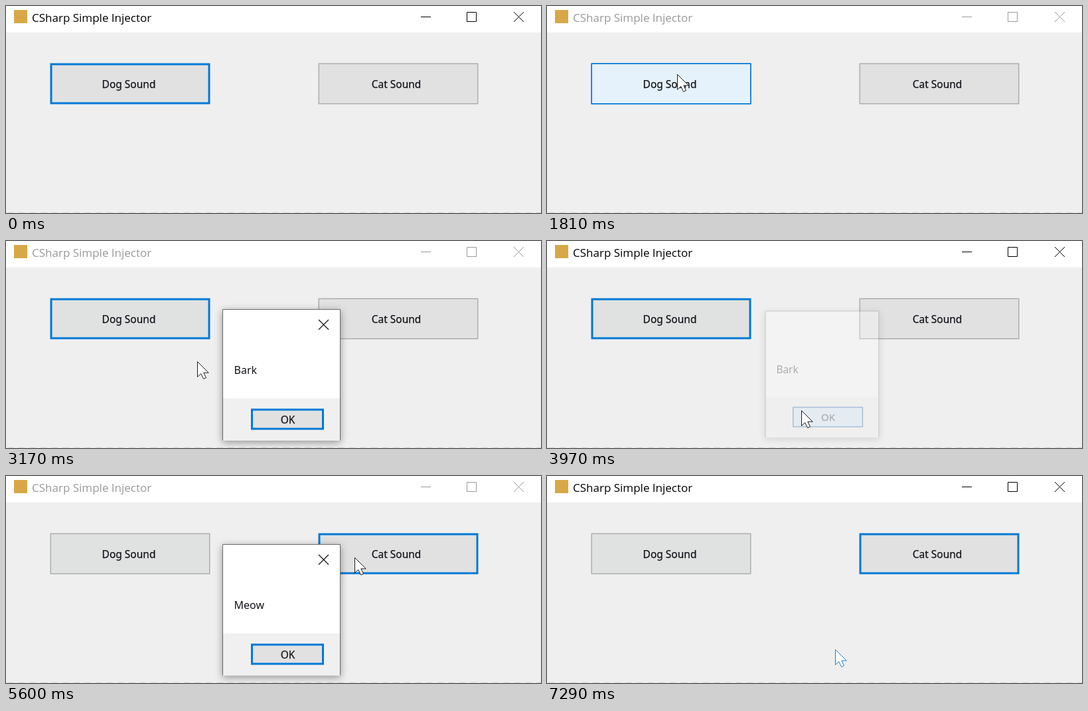
These frames come from a looping animation (806 by 313 pixels, 9.35 s). An HTML page:

```html
<!DOCTYPE html>
<html lang="en">
<head>
<meta charset="utf-8">
<title>CSharp Simple Injector</title>
<style>
  html, body { margin: 0; width: 100%; height: 100%; overflow: hidden; background: #efefef; }
  svg { display: block; width: 100%; height: 100%; }
  text { font-family: "Noto Sans", "Open Sans", sans-serif; font-size: 15.5px; fill: #14141c; }
  #title { font-family: "Open Sans", "Noto Sans", sans-serif; font-size: 17px; }
  .mid { text-anchor: middle; stroke: #14141c; stroke-width: .25px; }
  #box { filter: drop-shadow(0 3px 6px rgba(0, 0, 0, .38)); }
</style>
</head>
<body>
<svg viewBox="0 0 806 313">
  <rect width="806" height="313" fill="#efefef"/>
  <rect width="806" height="40" fill="#fff"/>
  <path d="M2 312.5H806" stroke="#d2d2d2" stroke-dasharray="10 6.6"/>
  <rect x="12" y="6" width="20" height="20" fill="#d8a848"/>
  <text id="title" x="39" y="24">CSharp Simple Injector</text>
  <path id="caption" fill="none"
    d="M625 16.5h15M694.5 9.5h14v14h-14zM765 9l15 15M780 9l-15 15"/>
  <g id="dog"></g>
  <g id="cat"></g>
  <g id="box">
    <rect x="326.5" y="103.5" width="177" height="198" fill="#fff"/>
    <rect x="326.5" y="238" width="177" height="63.5" fill="#f0f0f0"/>
    <path d="M326.5 301.5V103.5H503.5V301.5" fill="none" stroke="#6a6a6a"/>
    <path id="shut" d="M471 119l15 15M486 119l-15 15" stroke="#111" stroke-width="1.2"/>
    <text id="msg" x="343.5" y="201" style="font-size:16px"></text>
    <g id="ok"></g>
  </g>
  <path id="cursor" fill="#fff" stroke-linejoin="round"
    d="M.5.5V23.5L5.7 18.6L9.6 26.5L13.5 24.8L9.8 17.2H17.2Z"/>
</svg>
<script>
const LOOP = 9350, STEP = 200 / 3;
const $ = id => document.getElementById(id);
const ramp = (t, start, length) => Math.max(0, Math.min(1, (t - start) / length));
const within = (t, a, b) => t >= a && t < b;
const easeOut = k => 1 - (1 - k) ** 2;

// Bursts of activity; the picture rests between them.
const bursts = [
  [260, 260], [920, 1810], [2010, 2500], [3170, 4050],
  [4320, 4730], [5190, 5600], [5930, 6420], [6880, 7290]
];

const moves = [
  { at: 920, span: 800, from: [400, 296], to: [196, 103] },
  { at: 3170, span: 333, from: [288, 182], to: [383, 256] },
  { at: 4320, span: 333, from: [395, 246], to: [525, 123] },
  { at: 5930, span: 400, from: [522, 128], to: [434, 262] }
];

// One click on a button: pressed, message shown, OK pressed, message closed.
const clicks = [
  { msg: "Bark", press: 2010, open: 2165, overOk: 3340, accept: 3700, close: 3840 },
  { msg: "Meow", press: 5190, open: 5280, overOk: 6240, accept: 6880, close: 7077 }
];

// Fill, border colour, border width.
const looks = {
  normal: ["#e1e1e1", "#adadad", 1.5],
  used: ["#dfe2e0", "#adadad", 1.5],
  focus: ["#e1e1e1", "#0078d7", 3],
  usedFocus: ["#dfe2e0", "#0078d7", 3],
  hover: ["#e5f1fb", "#0078d7", 1.5],
  pressed: ["#cce4f7", "#005499", 1.5]
};

function makeButton(id, x, y, w, h, label, cx, base) {
  $(id).innerHTML = `<rect/><rect/><text class="mid" x="${cx}" y="${base}">${label}</text>`;
  const [back, glow] = $(id).querySelectorAll("rect");
  function paint(el, look) {
    const [fill, stroke, line] = looks[look];
    const attrs = {
      x: x + line / 2, y: y + line / 2, width: w - line, height: h - line,
      fill, stroke, "stroke-width": line
    };
    for (const key in attrs) el.setAttribute(key, attrs[key]);
  }
  paint(glow, "hover");
  return (look, hover) => {
    paint(back, look);
    glow.setAttribute("opacity", hover);
  };
}

const dog = makeButton("dog", 66.5, 86.5, 241, 62, "Dog Sound", 185, 124);
const cat = makeButton("cat", 470.5, 86.5, 241, 62, "Cat Sound", 588, 124);
const ok = makeButton("ok", 369, 253.5, 110, 32, "OK", 424.5, 276);

function settle(t) {
  let now = 0;
  for (const [start, end] of bursts) {
    if (t < start) break;
    const last = Math.round((end - start) / STEP) - 1;
    const n = Math.min(Math.floor((t - start + 1) / STEP), last);
    now = t >= end ? end : start + n * STEP;
  }
  return now;
}

function drawCursor(t) {
  const move = moves.filter(m => m.at <= t).pop();
  const cursor = $("cursor");
  cursor.setAttribute("visibility", move ? "visible" : "hidden");
  if (!move) return;
  const k = easeOut(ramp(t, move.at, move.span));
  const [x, y] = move.from.map((v, i) => v + (move.to[i] - v) * k);
  cursor.setAttribute("transform", `translate(${x} ${y})`);
  cursor.setAttribute("stroke", t >= 7290 ? "#1a7fcf" : "#1c1c1c");
}

function drawBox(t, click) {
  const shown = ramp(t, click.open, 200) * (1 - ramp(t, click.close, 186));
  const scale = .95 + .05 * shown;
  const box = $("box");
  box.setAttribute("visibility", shown > 0 ? "visible" : "hidden");
  box.setAttribute("opacity", shown);
  box.setAttribute("transform",
    `translate(398 174) scale(${scale}) translate(-398 -174)`);
  $("msg").textContent = click.msg;
  $("shut").setAttribute("opacity", t < click.close ? 1 : 0);
  const held = t >= click.accept;
  ok(held ? "pressed" : "focus", held ? 0 : ramp(t, click.overOk, 160));
}

function draw(time) {
  const t = settle(time);
  const [bark, meow] = clicks;
  const active = t < 260 || within(t, bark.press, bark.open + 35) ||
    within(t, bark.close, meow.open + 40) || t >= meow.close;
  $("title").style.fill = active ? "#000" : "#999";
  $("caption").setAttribute("stroke", active ? "#000" : "#999");

  const held = c => within(t, c.press, c.press + 130);
  dog(held(bark) ? "pressed" : t < bark.press ? "focus" : t < meow.press ? "usedFocus" : "used",
    t < bark.press ? ramp(t, 1380, 200) : 0);
  cat(held(meow) ? "pressed" : t < meow.press ? "normal" : "focus",
    t < meow.press ? ramp(t, 4460, 190) : 0);
  drawBox(t, t < meow.press ? bark : meow);
  drawCursor(t);
}

const began = performance.now();
function tick() {
  draw((performance.now() - began) % LOOP);
  requestAnimationFrame(tick);
}
tick();
</script>
</body>
</html>
```
